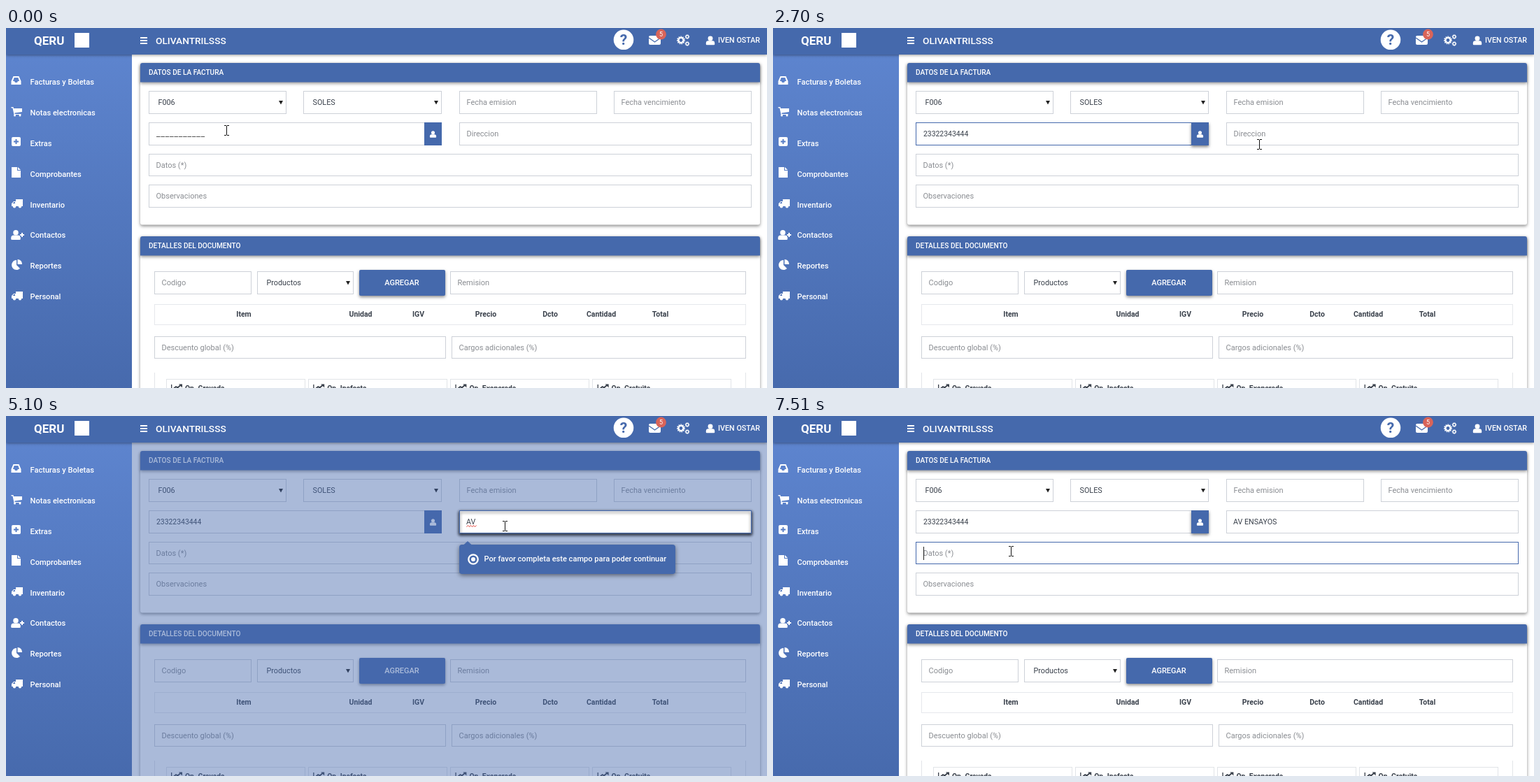
These frames come from a looping animation (1088 px wide and 515 px high, 8000 ms). An HTML page with a canvas:

```html
<!DOCTYPE html>
<html lang="es">
<head>
<meta charset="utf-8">
<title>Factura</title>
<style>
html, body { margin: 0; width: 100%; height: 100%; overflow: hidden; background: #fff; }
canvas { display: block; width: 1088px; height: 515px; }
</style>
</head>
<body>
<canvas id="stage" width="1088" height="515"></canvas>
<script>
const ctx = document.getElementById('stage').getContext('2d');
const LOOP = 8000, STEP = 76;
const BLUE = '#4569ac', DARK = '#39404b', HINT = '#8a8d92', LINE = '#cdd1d8';
const clamp = v => Math.max(0, Math.min(1, v));
const between = (t, a, b) => t >= a && t < b;
const ramp = (t, from, n) => t < from ? 0 : clamp((Math.floor((t - from) / STEP) + 1) / n);

function text(s, x, y, size, color, weight = 400, align = 'left') {
  ctx.font = `${weight} ${size}px Roboto, "Liberation Sans", sans-serif`;
  ctx.textAlign = align;
  ctx.fillStyle = color;
  ctx.fillText(s, x, y);
  return ctx.measureText(s).width;
}

function rect(x, y, w, h, color) {
  ctx.fillStyle = color;
  ctx.fillRect(x, y, w, h);
}

function round(x, y, w, h, r, color) {
  ctx.fillStyle = color;
  ctx.beginPath();
  ctx.roundRect(x, y, w, h, r);
  ctx.fill();
}

function dot(x, y, r, color) {
  ctx.fillStyle = color;
  ctx.beginPath();
  ctx.arc(x, y, r, 0, 7);
  ctx.fill();
}

function ring(x, y, r, width, color) {
  ctx.strokeStyle = color;
  ctx.lineWidth = width;
  ctx.beginPath();
  ctx.arc(x, y, r, 0, 7);
  ctx.stroke();
}

function shape(d, x, y, color = '#fff', outline) {
  const p = new Path2D(d);
  ctx.save();
  ctx.translate(x, y);
  ctx.fillStyle = color;
  ctx.fill(p, 'evenodd');
  if (outline) {
    ctx.strokeStyle = outline;
    ctx.lineWidth = 1;
    ctx.stroke(p);
  }
  ctx.restore();
}

function shadowed(alpha, draw, blur = 4, dy = 2) {
  ctx.save();
  ctx.shadowColor = `rgba(0,0,0,${alpha})`;
  ctx.shadowBlur = blur;
  ctx.shadowOffsetY = dy;
  draw();
  ctx.restore();
}

function frame(x, y, w, h, color = LINE, alpha = 1) {
  ctx.globalAlpha = alpha;
  ctx.strokeStyle = color;
  ctx.lineWidth = 1;
  ctx.strokeRect(x + .5, y + .5, w - 1, h - 1);
  ctx.globalAlpha = 1;
}

function field(x, y, w, h, label, focus = 0) {
  rect(x, y, w, h, '#fff');
  frame(x, y, w, h);
  if (focus > 0) frame(x, y, w, h, BLUE, focus);
  if (label) text(label, x + 10.5, y + h / 2 + 3.7, 11, HINT);
}

function select(x, y, w, label) {
  field(x, y, w, 33);
  text(label, x + 13.5, y + 20, 10.8, DARK);
  shape('M0 0H6L3 5.5Z', x + w - 11, y + 14, '#222');
}

function card(y, h, title) {
  shadowed(.45, () => round(192, y, 886, h, 3, '#fff'));
  shadowed(.4, () => round(192, y, 886, 27.5, [3, 3, 0, 0], BLUE));
  text(title, 204, y + 16.8, 10.1, '#fff', 500);
}

function person(x, y, s, color) {
  dot(x, y - 2.6 * s, 3 * s, color);
  round(x - 5.4 * s, y + .3 * s, 10.8 * s, 5.2 * s, [3 * s, 3 * s, s, s], color);
}

function gear(x, y, r) {
  ring(x, y, r, r * .65, '#fff');
  ctx.save();
  ctx.setLineDash([r * .42, r * .365]);
  ring(x, y, r * 1.4, r * .5, '#fff');
  ctx.restore();
}

const TRUCK = 'M6 0H16V10H0V6L3 3H6ZM1.5 6H5V4H3.5Z';
function truck(y) {
  shape(TRUCK, 8, y);
  dot(12, y + 10.5, 2.1, '#fff');
  dot(20, y + 10.5, 2.1, '#fff');
}

function sidebar() {
  const g = ctx.createLinearGradient(0, 38, 0, 515);
  g.addColorStop(0, '#5d84ce');
  g.addColorStop(1, '#476aad');
  rect(0, 38, 180, 477, g);
  ['Facturas y Boletas', 'Notas electronicas', 'Extras', 'Comprobantes',
    'Inventario', 'Contactos', 'Reportes', 'Personal']
    .forEach((s, i) => text(s, 34.5, 80.7 + 43.95 * i, 11.1, '#fff', 500));
  shape('M3 0H11L14 7V12H0V7ZM4.2 2L2.4 7H4.5L5.5 9H8.5L9.5 7H11.6L9.8 2Z', 7.5, 69);
  shape('M0 0H3L3.4 2H15.5V7L5 8.6V10H14V11H4L2 1.4H0Z', 7.5, 113);
  dot(12.5, 125, 1.5, '#fff');
  dot(20, 125, 1.5, '#fff');
  shape('M2 0H11Q13 0 13 2V11Q13 13 11 13H2Q0 13 0 11V2Q0 0 2 0ZM5.5 3V5.5H3V7.5H5.5V10H7.5V7.5H10V5.5H7.5V3Z', 8, 156);
  shape('M0 0H8V5H13V15H0ZM9 0L13 4H9Z', 8, 199);
  truck(245);
  person(14, 296, 1.25, '#fff');
  shape('M2 0H4V2H6V4H4V6H2V4H0V2H2Z', 20, 293);
  shape('M7 1V8L12 13A7 7 0 1 1 7 1ZM8.5 0A6.5 6.5 0 0 1 15 7H8.5Z', 8, 331);
  truck(377);
}

function topBar() {
  shadowed(.4, () => rect(0, 0, 1088, 38, BLUE), 4, 1);
  text('QERU', 40, 24, 17, '#fff', 700);
  rect(98, 7, 21, 21, '#fff');
  for (let i = 0; i < 3; i++) rect(192, 13 + i * 4, 10, 2, '#fff');
  text('OLIVANTRILSSS', 214, 22.6, 13.7, '#fff', 500);
  dot(883, 16.8, 14.3, '#fff');
  text('?', 883, 24.4, 21, BLUE, 700, 'center');
  round(919, 11, 17, 13, 2, '#fff');
  ctx.strokeStyle = BLUE;
  ctx.lineWidth = 1.3;
  ctx.stroke(new Path2D('M919 14L927.5 20L936 14'));
  dot(936.5, 9, 7.4, '#d96459');
  text('5', 936.5, 12.3, 9, '#fff', 400, 'center');
  gear(965, 17.5, 3.6);
  gear(974, 12.5, 2);
  gear(974, 22.5, 2);
  person(1007, 18, 1.15, '#fff');
  text('IVEN OSTAR', 1018, 21, 10.75, '#fff', 500);
}

function caret(x, y, t, last) {
  if ((t - last + 80) % 1060 < 530) rect(Math.round(x), y, 1, 19, '#222');
}

// typed digits by time; the rest of the mask stays as underscores
const DIGITS = '23322343444';
const KEYS = [[620, 1], [770, 4], [920, 7], [1070, 8], [1240, 9], [1540, 10], [1940, 11]];

function idField(t, shadow) {
  const focus = ramp(t, 150, 2) - ramp(t, 3010, 3);
  const draw = () => field(204, 135, 395, 33, '', focus);
  shadow ? shadowed(.4 * shadow, draw) : draw();
  const lift = between(t, 920, 3160) || t >= 6000;
  const button = () => rect(598, 135, 25, 33, BLUE);
  lift ? shadowed(.5, button) : button();
  person(610.5, 152, .85, '#fff');

  let count = 0, last = 150;
  for (const [at, n] of KEYS) if (t >= at) [last, count] = [at, n];
  const end = 215 + text(DIGITS.slice(0, count), 215, 155, 10.4, DARK);
  for (let i = 0; i < 11 - count; i++) rect(end + i * 6.36, 155, 5.5, 1, '#555');
  if (between(t, 150, 3010)) caret(count ? end : 215, 142, t, last);
}

function addressField(t) {
  const focus = ramp(t, 3010, 3) - ramp(t, 6490, 3);
  const typed = t < 4180 ? '' : t < 4640 ? 'A' : t < 5250 ? 'AV' : 'AV ENSAYOS';
  const draw = () => field(648, 135, 418, 33, typed ? '' : 'Direccion', focus);
  between(t, 4260, 6490) ? shadowed(.45, draw) : draw();
  const w = text(typed, 658, 155, 10.7, DARK);
  if (between(t, 4640, 6490)) {
    ctx.strokeStyle = '#e0392f';
    ctx.lineWidth = 1;
    ctx.beginPath();
    for (let i = 0; i <= 7; i++) ctx.lineTo(658.5 + i * 2, i % 2 ? 156.5 : 158.5);
    ctx.stroke();
  }
  const last = t < 4180 ? 3030 : t < 4640 ? 4180 : t < 5250 ? 4640 : 5250;
  if (between(t, 3010, 6410)) caret(658 + w, 142, t, last);
}

function invoice(t) {
  card(50, 231.5, 'DATOS DE LA FACTURA');
  select(204, 90, 197, 'F006');
  select(425, 90, 198, 'SOLES');
  field(648, 90, 197, 33, 'Fecha emision');
  field(869, 90, 197, 33, 'Fecha vencimiento');
  idField(t, 0);
  addressField(t);
  field(204, 180, 862, 32, 'Datos (*)', ramp(t, 6490, 3));
  if (t >= 6410) caret(215, 187, t, 6510);
  field(204, 224, 862, 33, 'Observaciones');
}

function details() {
  card(298, 240, 'DETALLES DEL DOCUMENTO');
  field(212, 348, 139, 33, 'Codigo');
  select(359, 348, 138, 'Productos');
  shadowed(.45, () => round(505, 346, 123, 37, 2, BLUE));
  text('AGREGAR', 566, 367.7, 11, '#fff', 500, 'center');
  field(635, 348, 423, 33, 'Remision');
  frame(212, 395, 846, 30, '#e6e8ec');
  [['Item', 340], ['Unidad', 507], ['IGV', 589.5], ['Precio', 686], ['Dcto', 778],
    ['Cantidad', 851], ['Total', 935.5]]
    .forEach(([s, x]) => text(s, x, 412.8, 10.5, DARK, 700, 'center'));
  field(212, 441, 417, 32, 'Descuento global (%)');
  field(637, 441, 421, 32, 'Cargos adicionales (%)');
  rect(212, 493, 1, 22, '#e3e5e9');
  rect(1057, 493, 1, 22, '#e3e5e9');
  ['Gravada', 'Inafecta', 'Exonerada', 'Gratuita'].forEach((s, i) => {
    const x = 228.5 + i * 203.2;
    frame(Math.round(x), 502, 199, 30, '#e1e4e8');
    rect(x + 7.5, 510, 1.3, 6, DARK);
    ctx.strokeStyle = DARK;
    ctx.lineWidth = 1.8;
    ctx.beginPath();
    ctx.moveTo(x + 11, 516);
    ctx.lineTo(x + 14.5, 513);
    ctx.lineTo(x + 17, 514.5);
    ctx.lineTo(x + 21, 511);
    ctx.stroke();
    shape('M0 0H5V5Z', x + 18.5, 509.5, DARK);
    text('Op. ' + s, x + 27.5, 519, 10.3, DARK, 700);
  });
}

function tooltip(x, alpha) {
  ctx.globalAlpha = alpha;
  shadowed(.5, () => round(x, 184, 309, 42, 4, BLUE), 6);
  shape('M0 5.5L6 0L12 5.5Z', x + 6, 179, BLUE);
  ring(x + 20, 205, 6.7, 2.3, '#fff');
  dot(x + 20, 205, 3, '#fff');
  text('Por favor completa este campo para poder continuar', x + 35.5, 207.8, 11.05, '#fff', 500);
  ctx.globalAlpha = 1;
}

function guide(t) {
  const first = t < 920 ? 0 : 1 - ramp(t, 2170, 4);
  const second = t < 5250 ? ramp(t, 4260, 3) : 0;
  const alpha = Math.max(first, second);
  if (!alpha) return;
  rect(180, 38, 908, 477, `rgba(69,105,172,${.455 * alpha})`);
  if (first) idField(t, first);
  else addressField(t);
  tooltip(first ? 204 : 648, alpha);
}

// cursor stops: time, x, y
const PATH = [[2170, 315, 146], [2320, 400, 154], [2550, 622, 174], [2700, 692, 168],
  [2930, 713, 157], [5600, 713, 157], [5900, 640, 150], [6100, 540, 160], [6410, 340, 193]];

function cursor(t) {
  const q = Math.floor(t / STEP + .5) * STEP;
  let [, x, y] = PATH[0];
  PATH.forEach(([at, px, py], i) => {
    if (!i || q < PATH[i - 1][0]) return;
    const [from, ax, ay] = PATH[i - 1];
    const k = clamp((q - from) / (at - from));
    x = Math.round(ax + (px - ax) * k);
    y = Math.round(ay + (py - ay) * k);
  });
  const overText = (between(y, 135, 168) && (between(x, 204, 598) || between(x, 648, 1066)))
    || between(y, 180, 212);
  if (overText) {
    rect(x, y - 6, 1, 13, '#111');
    for (const dy of [-7, 7]) {
      rect(x - 3, y + dy, 3, 1, '#111');
      rect(x + 1, y + dy, 3, 1, '#111');
    }
    return;
  }
  shape('M0 0V14.5L3.5 11.3L6 16.5L8.3 15.5L6 10.5H10.5Z', x + .5, y + .5, '#fff', '#111');
  if (t < 3000) ring(x + 11.5, y + 1, 4.4, 3.4, '#2196dd');
}

function draw(t) {
  rect(0, 0, 1088, 515, '#fff');
  invoice(t);
  details();
  guide(t);
  sidebar();
  topBar();
  cursor(t);
}

const start = performance.now();
function tick() {
  draw((performance.now() - start) % LOOP);
  requestAnimationFrame(tick);
}
tick();
</script>
</body>
</html>
```
